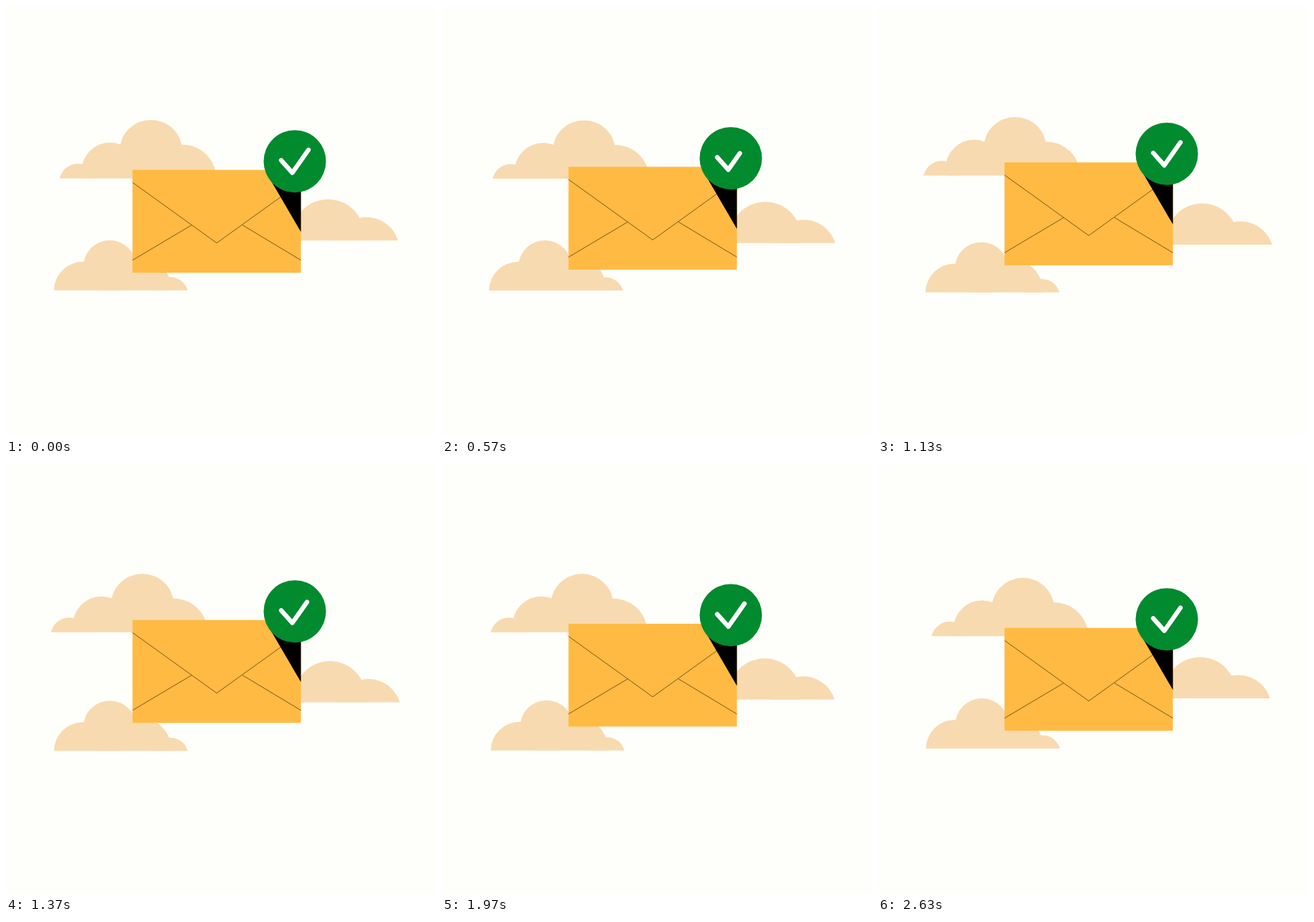
An HTML page that plays this animation: 600 by 600 pixels, repeating every 2660 ms.

```html
<!DOCTYPE html>
<html lang="en">
<head>
<meta charset="utf-8">
<title>Mail delivered</title>
<style>
  html, body { margin: 0; width: 100%; height: 100%; overflow: hidden; background: #fefefa; }
  svg { display: block; width: 100vw; height: 100vh; }
</style>
</head>
<body>
<svg viewBox="0 0 600 600">
  <defs>
    <clipPath id="sky"><rect x="-300" y="-200" width="600" height="200"/></clipPath>
  </defs>
  <g id="clouds" fill="#f8dab0"></g>
  <g id="mail">
    <rect x="176.5" width="235" height="143.5" fill="#ffba43"/>
    <path d="M176.5 17.5L294 102L411.5 17.5M176.5 126L259 77M411.5 126L330 77"
      fill="none" stroke="#5c3f12" stroke-width=".8"/>
    <path d="M366.5 9.5L411.5 86.5V0H380Z"/>
    <circle cx="403" cy="-12" r="43.5" fill="#028a2e"/>
    <path id="tick" d="M384 -13.3L399.5 4L422 -28" pathLength="100" fill="none"
      stroke="#fff" stroke-width="6.3" stroke-linecap="round" stroke-linejoin="round"/>
  </g>
</svg>
<script>
const LOOP = 2660, HALF = LOOP / 2;
const $ = id => document.getElementById(id);
const mail = $('mail'), tick = $('tick');

// One sine per loop around mid, highest at time peak.
const wave = (mid, amp, peak) => t => mid + amp * Math.cos(2 * Math.PI * (t - peak) / LOOP);

// Each cloud is a row of circles [x, y, r] around its base corner, cut flat at the base.
const clouds = [
  {
    puffs: [[24.5, 5.5, 26], [69.5, -10, 40], [126.5, -37.5, 44], [170.5, 0, 47]],
    x: wave(69.8, 6, 40), y: wave(237.7, 3.9, 330)
  },
  {
    puffs: [[40.5, .5, 40.5], [78, -33, 37], [119.5, -2, 44.2], [162.5, 6.5, 25]],
    x: wave(66.8, 1.2, 2000), y: wave(398.5, 2, 1590)
  },
  {
    puffs: [[-97.5, -7.5, 50], [-44, 13.5, 46]],
    x: wave(548.3, 1.5, 1130), y: wave(329.9, 3.1, 1130)
  }
];
const mailY = wave(223.2, 5.5, 0);

function make(tag, attrs, parent) {
  const el = document.createElementNS('http://www.w3.org/2000/svg', tag);
  for (const k in attrs) el.setAttribute(k, attrs[k]);
  return parent.appendChild(el);
}

const place = (el, x, y) => el.setAttribute('transform', `translate(${x} ${y})`);

for (const cloud of clouds) {
  cloud.el = make('g', { 'clip-path': 'url(#sky)' }, $('clouds'));
  for (const [cx, cy, r] of cloud.puffs) make('circle', { cx, cy, r }, cloud.el);
}

// The tick retracts, then is drawn again, twice per loop.
function drawn(t) {
  const p = t % HALF;
  if (p < 270) return (1 + Math.cos(Math.PI * p / 270)) / 2;
  return Math.min(1, Math.max(0, (p - 300) / 330));
}

function render(t) {
  place(mail, 0, mailY(t));
  for (const c of clouds) place(c.el, c.x(t), c.y(t));
  const part = drawn(t);
  tick.style.visibility = part > .005 ? 'visible' : 'hidden';
  tick.setAttribute('stroke-dasharray', part < 1 ? `${part * 100} 200` : 'none');
}

const start = performance.now();
function loop() {
  render((performance.now() - start) % LOOP);
  requestAnimationFrame(loop);
}
loop();
</script>
</body>
</html>
```
